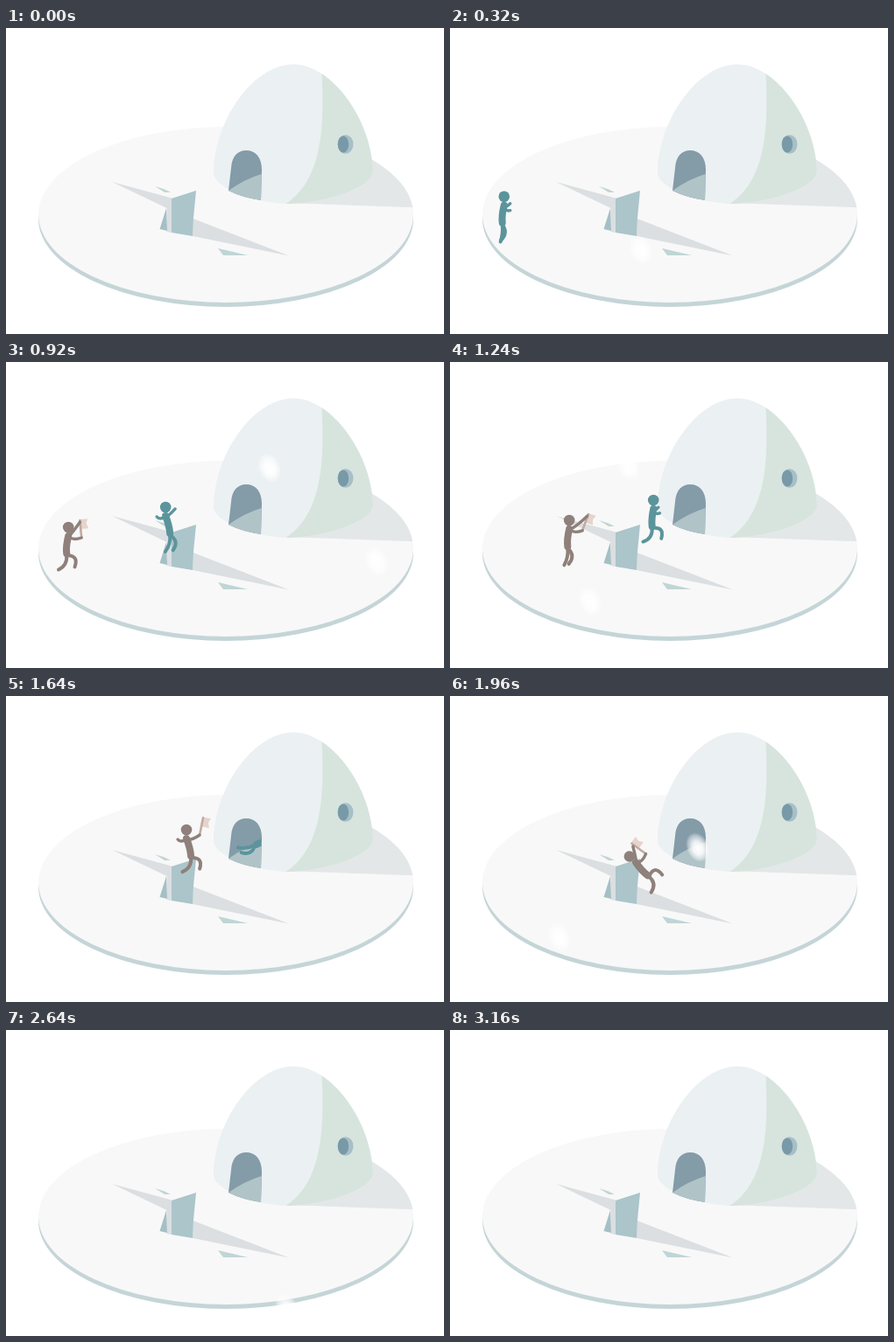
Write an HTML page with a canvas that moves like this. It is 500 px wide and 350 px high and loops after 3.2 s.

```html
<!DOCTYPE html>
<html lang="en">
<head>
<meta charset="utf-8">
<title>Igloo chase</title>
<style>
html, body { margin: 0; width: 100%; height: 100%; overflow: hidden; background: #fff; }
canvas { display: block; }
</style>
</head>
<body>
<canvas id="stage" width="500" height="350"></canvas>
<script>
const ctx = document.getElementById('stage').getContext('2d');
const LOOP = 3200, STEP = 271;
const { sin, cos, exp, PI } = Math;

const disc = new Path2D();
disc.ellipse(251, 213.5, 214, 100.5, 0, 0, 7);
const egg = new Path2D('M237 163C240 100 285 41.5 328 41.5C372 41.5 417 105 419 163C419 183 362 201 320 201C280 199 234 182 237 163Z');

function fill(color, path) {
  ctx.fillStyle = color;
  ctx.fill(typeof path === 'string' ? new Path2D(path) : path);
}
function oval(color, x, y, rx, ry) {
  const p = new Path2D();
  p.ellipse(x, y, rx, ry, 0, 0, 7);
  fill(color, p);
}
function clipped(path, draw) {
  ctx.save();
  ctx.clip(path);
  draw();
  ctx.restore();
}

function scenery() {
  fill('#fff', 'M0 0H500V350H0Z');
  oval('#c5d5d7', 251, 218.5, 214, 100.5);
  fill('#f8f8f8', disc);
  clipped(disc, () => fill('#e3e7e8', 'M318 200L470 205.300V140H410Z'));

  fill('#dbdfe1', 'M121 176L189 194.500V234L183.500 233V206Z');
  fill('#dbdfe1', 'M213.500 218L323 260.500L213 238Z');
  fill('#abc5ca', 'M189 195L217 186L214 217L213 238L189 234Z');
  fill('#a5c0c5', 'M183 206L184 232L175.500 230Z');
  fill('#c3d5d6', 'M170 181L181 184.500L188 188H181Z');
  fill('#c0d5d6', 'M242 252L276 260H248Z');

  fill('#ebf0f3', egg);
  clipped(egg, () => fill('#d7e4dd', 'M360 45C364 110 362 175 318 202H430V45Z'));
  oval('#a7bfc7', 387.5, 133, 9, 10.8);
  oval('#7899a7', 385, 133, 6.2, 9.6);
  fill('#849ba8', 'M254 186L257 160C258 146 265 140 274 140C285 140 292 148 292 162L291 197Q270 194 254 186Z');
  fill('#b0c4c8', 'M254 186Q272 173 291.800 167L291 197Q270 194 254 186Z');
}

// Keys: time, body centre x and y, lean.
const runner = {
  color: '#5c949c', leap: 920, passing: 600,
  path: [[80, 14, 222, 0], [600, 117, 202, 0], [920, 182, 186, 0], [1240, 232, 178, 0], [1640, 296, 168, 1.2], [1760, 330, 175, 1.2]]
};
const hunter = {
  color: '#8f807b', leap: 1640, passing: 736, flag: true,
  path: [[440, -26, 229, 0], [600, 6, 221, 0], [920, 71, 209, 0], [1240, 136, 201, 0], [1640, 206, 173, 0], [1840, 218, 178, -0.4], [2280, 223, 248, -1.9], [2400, 223, 290, -1.9]]
};

const mix = (a, b, u) => a.map((v, i) => v + (b[i] - v) * u);
const along = ([x, y], len, angle) => [x + len * sin(angle), y + len * cos(angle)];

function place(path, t) {
  const n = path.findIndex(k => k[0] > t);
  if (n < 1) return null;
  const a = path[n - 1], b = path[n];
  return mix(a, b, (t - a[0]) / (b[0] - a[0]));
}

// Curved stroke that passes through the middle joint.
function limb(color, width, [ax, ay], [jx, jy], [bx, by]) {
  ctx.strokeStyle = color;
  ctx.lineWidth = width;
  ctx.lineCap = 'round';
  ctx.beginPath();
  ctx.moveTo(ax, ay);
  ctx.quadraticCurveTo(2 * jx - (ax + bx) / 2, 2 * jy - (ay + by) / 2, bx, by);
  ctx.stroke();
}

function drawFlag([x, y], tilt) {
  ctx.save();
  ctx.translate(x, y);
  ctx.rotate(tilt);
  fill('#e5d4cd', 'M0 -21L9 -21L7 -16L9 -10H0Z');
  limb('#c3aaa1', 2.6, [0, 0], [0, -10], [0, -20]);
  ctx.restore();
}

function figure({ color, leap, passing, path, flag }, t) {
  const spot = place(path, t);
  if (!spot) return;
  const phase = PI * (t - passing) / STEP;
  const spread = sin(phase) ** 2;
  const air = exp(-(((t - leap) / 200) ** 2));
  const tilt = 0.2 - 0.35 * sin(phase) * (1 - air);

  const hip = [7 * air - 2, 12];
  const shoulder = [0, -9];
  const hand = flag ? [15, -8 - 6 * air] : [7 + 4 * air, -4 - 14 * air];
  const grip = flag ? along(hand, -18, -tilt) : [7, -12];
  const rear = mix(grip, [-10, -9], air);

  ctx.save();
  ctx.translate(spot[1], spot[2]);
  ctx.rotate(spot[3]);
  if (flag) drawFlag(hand, tilt);
  for (const end of [hand, rear]) {
    const [mx, my] = mix(shoulder, end, 0.5);
    limb(color, 3.4, shoulder, [mx - 1, my + 2], end);
  }
  const legs = [[0.3 + 1.3 * spread, 0.7 * spread - 0.5], [-0.25 * spread, -0.2 - 0.9 * spread]];
  for (const [thigh, shin] of legs) {
    const knee = along(hip, 10, thigh);
    limb(color, 4, hip, knee, along(knee, 10, shin));
  }
  limb(color, 8, [0, -10], [hip[0] / 2 + 2 * air - 1, 1], [hip[0], 10]);
  oval(color, 0, -20, 6.3, 6.3);
  ctx.restore();
}

// Time and x at which each flake passes y = 200.
const flakes = [
  [236, 193], [600, 259], [877, 410], [1047, 337], [1124, 126], [1370, 241],
  [1841, 90], [2004, 295], [2453, 266], [2835, 99], [2923, 273]
];

function snow(t) {
  for (const [passes, x] of flakes) {
    const dt = t - passes, y = 200 + 0.629 * dt;
    if (y < -20 || y > 370) continue;
    ctx.save();
    ctx.translate(x + 0.289 * dt, y);
    ctx.rotate(-0.4);
    ctx.scale(0.72, 1);
    const glow = ctx.createRadialGradient(0, 2, 0, 0, 0, 17.5);
    glow.addColorStop(0, '#fff');
    glow.addColorStop(0.45, 'rgba(255,255,255,.85)');
    glow.addColorStop(0.8, 'rgba(255,255,255,.4)');
    glow.addColorStop(1, 'rgba(255,255,255,0)');
    oval(glow, 0, 0, 17.5, 17.5);
    ctx.restore();
  }
}

const field = new Path2D('M22.500 0H500V350H22.500Z');
const doorway = new Path2D('M0 0H291.500V197Q270 194 254 186L230 230H0Z');
const aboveCrack = new Path2D('M176 0H500V296.600L176 230Z');

function frame() {
  const t = performance.now() % LOOP;
  scenery();
  clipped(t > 1400 ? doorway : field, () => figure(runner, t));
  clipped(t > 1760 ? aboveCrack : field, () => figure(hunter, t));
  if (t >= 80) snow(t);
  requestAnimationFrame(frame);
}
frame();
</script>
</body>
</html>
```
